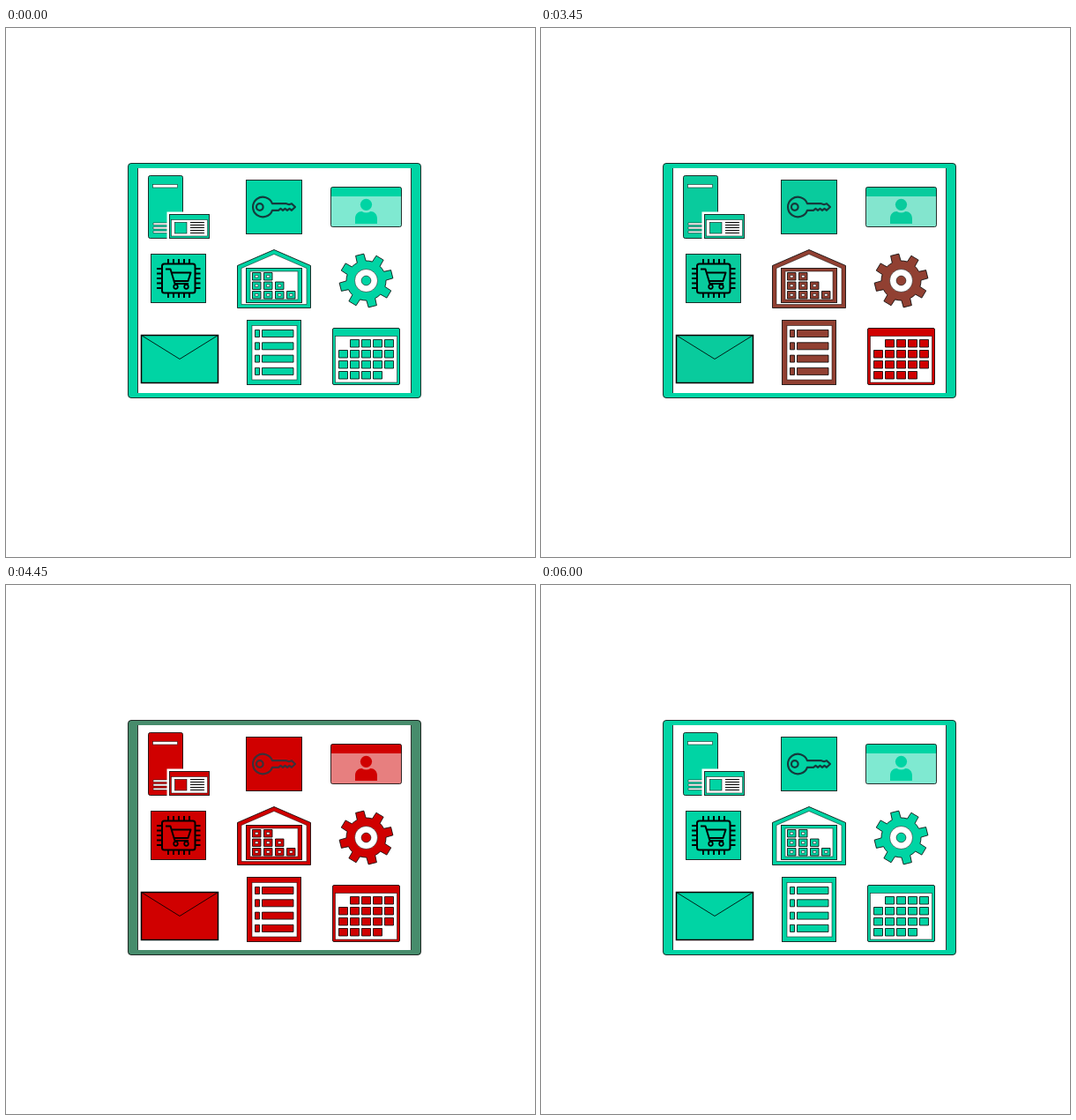
Recreate the animation shown at these times as an HTML page. Size 600 by 600 pixels, loop 6.04 s.

```html
<!DOCTYPE html>
<html lang="en">
<head>
<meta charset="utf-8">
<title>Status board</title>
<style>
  html, body { margin: 0; width: 100%; height: 100%; overflow: hidden; background: #fff; }
  svg { display: block; width: 600px; height: 600px; }

  .board, .late, .mid, .early { --ok: #00d4a4; --bad: #d00000; color: var(--ok); animation: 6040ms linear infinite; }
  .early { animation-name: early; }
  .mid   { animation-name: mid; }
  .late  { animation-name: late; }
  .board { animation-name: board; }
  .key   { stroke: #143a3c; animation: key 6040ms linear infinite; }

  /* Each fade lasts about 830 ms; everything resets at 6000 ms. */
  @keyframes early { 0%, 37.91% { color: var(--ok); } 51.6%,  99.33% { color: var(--bad); } 99.335%, 100% { color: var(--ok); } }
  @keyframes mid   { 0%, 47.52% { color: var(--ok); } 61.31%, 99.33% { color: var(--bad); } 99.335%, 100% { color: var(--ok); } }
  @keyframes late  { 0%, 56.57% { color: var(--ok); } 70.36%, 99.33% { color: var(--bad); } 99.335%, 100% { color: var(--ok); } }
  @keyframes board { 0%, 68.99% { color: var(--ok); } 82.78%, 99.33% { color: var(--bad); } 99.335%, 100% { color: var(--ok); } }
  @keyframes key   { 0%, 56.57% { stroke: #143a3c; } 70.36%, 99.33% { stroke: #3c3038; } 99.335%, 100% { stroke: #143a3c; } }

  .c { fill: currentColor; stroke: #000; stroke-opacity: .8; }
  .p { fill: currentColor; }
  .w { fill: #fff; }
  .thin { stroke-width: .7; }
  .edge { stroke: #000; stroke-opacity: .7; stroke-width: .7; }
  .line { fill: none; stroke: #000; }
</style>
</head>
<body>
<svg viewBox="0 0 600 600">
  <g class="board">
    <rect class="c" x="138.5" y="153.5" width="332" height="266" rx="3.5"/>
    <rect class="w" x="149" y="159" width="311" height="255"/>
    <path class="line" stroke-opacity=".8" d="M149.5 159V414M459.5 159V414"/>
  </g>

  <g class="late">
    <!-- server -->
    <rect class="c" x="161.5" y="167.5" width="39" height="71" rx="2"/>
    <rect class="w edge" x="166.5" y="177.5" width="28" height="3.5"/>
    <path class="w edge" d="M167 221h17v2.4h-17zM167 225.6h17v2.4h-17zM167 230.2h17v2.4h-17z"/>
    <rect class="w" x="182.5" y="208.5" width="49" height="31"/>
    <rect class="c" x="185.5" y="211.5" width="45" height="27"/>
    <rect class="w edge" x="187.5" y="217.5" width="41" height="18.5"/>
    <rect class="c thin" x="191.5" y="220.5" width="13.5" height="12.5"/>
    <path class="line" stroke-width="1.2" d="M209 220.5h16M209 223.5h16M209 226.5h16M209 229.5h16M209 232.5h16"/>

    <!-- key -->
    <rect class="c" x="272.5" y="172.5" width="63" height="61"/>
    <g class="key" fill="none" stroke-width="2.2" stroke-linejoin="round">
      <path d="M302 199.2A11.3 11.3 0 1 0 302 206.8H309L311.5 204.8L314 206.8L316.5 204.8L319 206.8L321.5 204.8L324 206.8L328 203L324 199.2L321 200.2L318 199.2Z"/>
      <circle cx="287.8" cy="203" r="3.8"/>
    </g>

    <!-- contact card -->
    <rect class="w" x="368.5" y="180.5" width="80" height="45" rx="2"/>
    <rect class="p" x="368.5" y="180.5" width="80" height="45" rx="2" fill-opacity=".5"/>
    <path class="p" d="M368.5 191V182.5a2 2 0 0 1 2-2h76a2 2 0 0 1 2 2V191z"/>
    <rect class="line" stroke-opacity=".8" x="368.5" y="180.5" width="80" height="45" rx="2"/>
    <circle class="p" cx="408.5" cy="200.3" r="6.6"/>
    <path class="p" d="M396 222v-6c0-5 3.500-8 7.500-8q5 3 10 0c4 0 7.500 3 7.500 8v6z"/>

    <!-- chip with cart -->
    <rect class="c" x="164.500" y="256.500" width="62" height="55"/>
    <g class="line" stroke-width="2">
      <rect x="177" y="267.500" width="37.500" height="33" rx="2.500"/>
      <path id="pins"/>
      <path stroke-linejoin="round" d="M181 273.500h5.500l5 16.500h15.500M187.500 277.500h22l-3 9.500h-16"/>
      <g stroke-width="1.700"><circle cx="192.500" cy="293.500" r="2.300"/><circle cx="204.500" cy="293.500" r="2.300"/></g>
    </g>

    <!-- envelope -->
    <rect class="p" stroke="#000" stroke-width="1.500" x="153.500" y="348.500" width="87" height="54"/>
    <path class="line" stroke-opacity=".85" d="M153.500 348.500L197 375.500L240.500 348.500"/>
  </g>

  <g class="mid">
    <!-- warehouse -->
    <path class="c" d="M262.500 317.500V269.500L304 251.500L345.500 269.500V317.500z"/>
    <path class="w edge" d="M267 313.500V272.500L304 256.500L341 272.500V313.500z"/>
    <rect class="c" x="272.500" y="272.500" width="63" height="39"/>
    <rect class="w edge" x="277" y="276" width="54" height="32"/>
    <path class="c" id="crates"/>
    <path class="w edge" id="labels"/>

    <!-- gear -->
    <path class="c" id="gear"/>
    <circle class="w edge" cx="408.500" cy="286.500" r="13"/>
    <circle class="c thin" cx="408.500" cy="286.500" r="5.400"/>

    <!-- list -->
    <rect class="c" x="273.500" y="331.500" width="61" height="73"/>
    <rect class="w edge" x="279" y="337.500" width="51" height="61.500"/>
    <path class="c" id="rows"/>
  </g>

  <!-- calendar -->
  <g class="early">
    <rect class="c" x="370.500" y="340.500" width="76" height="64" rx="1.500"/>
    <rect class="w edge" x="373.500" y="349.500" width="70" height="52.500"/>
    <path class="c" id="days"/>
  </g>
</svg>
<script>
  const set = (id, d) => document.getElementById(id).setAttribute('d', d);
  const box = (x, y, w, h) => `M${x} ${y}h${w}v${h}h${-w}z`;
  const range = (n, f) => Array.from({ length: n }, (_, i) => f(i)).join('');

  // Boxes on a grid; spans gives the first and last column of each row.
  const grid = (spans, x, y, dx, dy, w, h) => spans.map(([a, b], r) =>
    range(b - a + 1, i => box(x + (a + i) * dx, y + r * dy, w, h))).join('');

  const stack = [[0, 1], [0, 2], [0, 3]];
  set('crates', grid(stack, 279.5, 277.5, 13, 10.5, 9.5, 8.5));
  set('labels', grid(stack, 282.5, 280.5, 13, 10.5, 3.5, 2.5));
  set('days', grid([[1, 4], [0, 4], [0, 4], [0, 3]], 377.5, 353.5, 13, 12, 10, 8.5));
  set('rows', range(4, i => {
    const y = 342.5 + i * 14.3;
    return box(282.5, y, 5, 8) + box(290.5, y, 35.5, 8);
  }));
  set('pins', range(5, i => {
    const x = 184 + i * 6, y = 273 + i * 5.5;
    return `M${x} 262v5M${x} 301v5M171 ${y}h6M215 ${y}h5.500`;
  }));

  // Eight teeth, each with two root and two tip corners.
  const polar = (r, deg) => {
    const a = deg * Math.PI / 180;
    return `${(408.5 + r * Math.cos(a)).toFixed(2)} ${(286.5 + r * Math.sin(a)).toFixed(2)}`;
  };
  set('gear', 'M' + Array.from({ length: 8 }, (_, i) => {
    const a = i * 45 - 14;
    return `${polar(22.5, a - 13)}L${polar(30.5, a - 9)}L${polar(30.5, a + 9)}L${polar(22.5, a + 13)}`
      + `A22.500 22.500 0 0 1 ${polar(22.5, a + 32)}`;
  }).join('L') + 'z');
</script>
</body>
</html>
```
